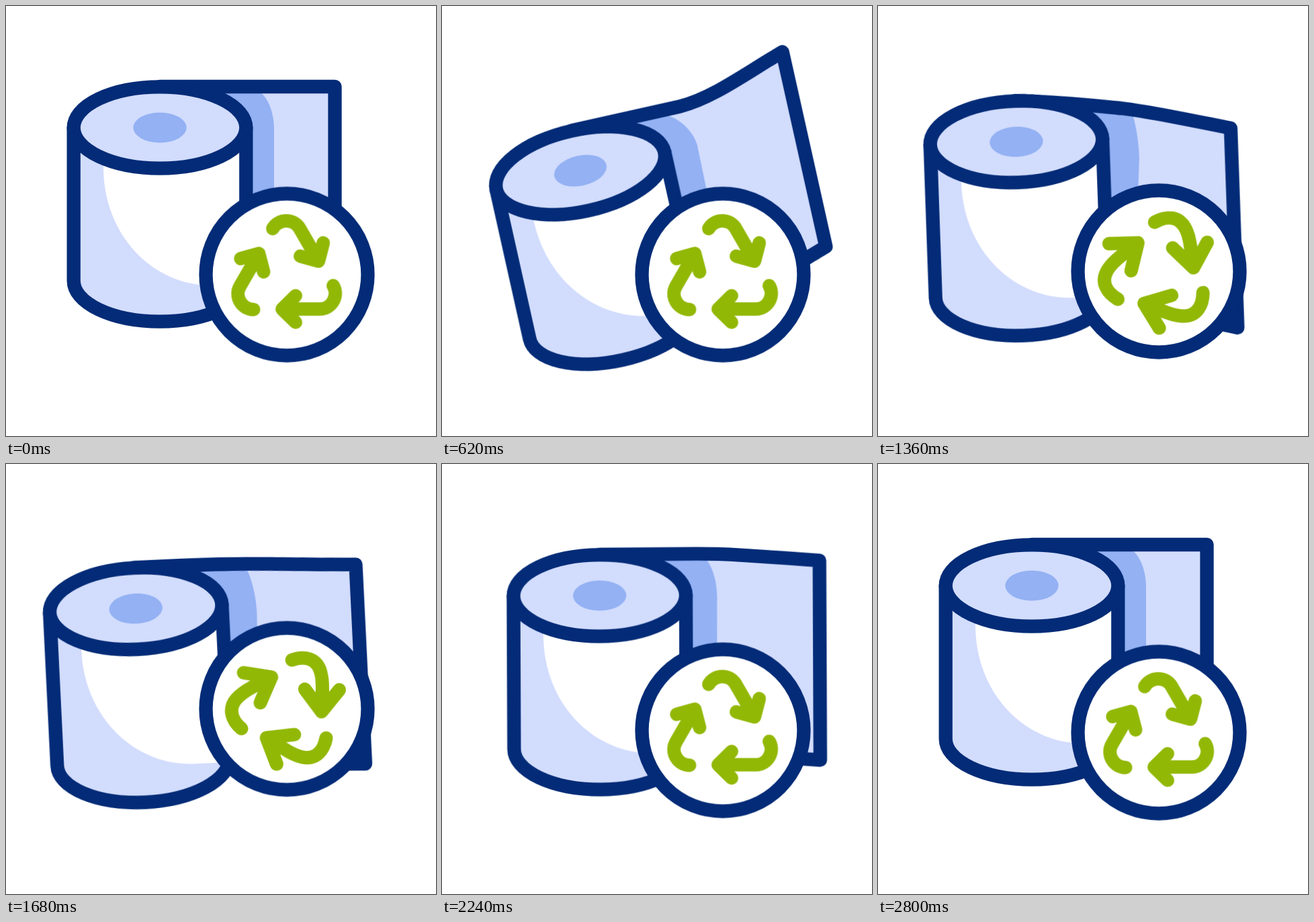
These frames come from a looping animation (640 px wide and 640 px high, 3.6 s). An HTML page without scripts:

```html
<!DOCTYPE html>
<html lang="en">
<head>
<meta charset="utf-8">
<title>Recycled paper roll</title>
<style>
html, body { margin: 0; width: 100%; height: 100%; overflow: hidden; background: #fff; }
svg { display: block; width: 100vw; height: 100vh; }
.line { stroke: #032b77; stroke-width: 20.3; stroke-linejoin: round; stroke-linecap: round; }
.light { fill: #d2dcfd; }
.shade { fill: #93b1f3; }
.white { fill: #fff; }
.none { fill: none; }
.arrow { fill: none; stroke: #92b806; stroke-width: 20; stroke-linecap: round; stroke-linejoin: round; }

.roll, .sheet, .fold, .badge, .spin, .arrow { animation: 3600ms linear infinite; }
.roll { animation-name: roll; }
.sheet { animation-name: sheet; }
.fold { animation-name: fold; }
.badge { animation-name: badge; }
.spin { animation-name: spin; }
.arrow { animation-name: stretch; }

/* whole roll: tilt back, spring up, sway left, settle */
@keyframes roll {
  0% { transform: translate(229px, 181px) rotate(0deg); animation-timing-function: cubic-bezier(.5, 0, .7, .8); }
  17.222% { transform: translate(206px, 245px) rotate(-12.6deg); animation-timing-function: ease-out; }
  18.333% { transform: translate(206px, 247px) rotate(-12.3deg); animation-timing-function: cubic-bezier(.5, 0, .7, .85); }
  28.889% { transform: translate(243px, 165px) rotate(6.9deg); animation-timing-function: ease-out; }
  30.556% { transform: translate(245px, 163.5px) rotate(7deg); animation-timing-function: cubic-bezier(.45, 0, .7, .7); }
  37.778% { transform: translate(206px, 202px) rotate(-2deg); animation-timing-function: cubic-bezier(.3, .4, .6, 1); }
  45% { transform: translate(190px, 214px) rotate(-3deg); animation-timing-function: cubic-bezier(.5, 0, .75, .7); }
  48.889% { transform: translate(206px, 220px) rotate(-2deg); animation-timing-function: cubic-bezier(.3, .4, .6, 1); }
  56.111% { transform: translate(240px, 211px) rotate(-.5deg); animation-timing-function: cubic-bezier(.4, 0, .5, 1); }
  68.889% { transform: translate(230px, 182.5px) rotate(0deg); animation-timing-function: ease-out; }
  77.778%, 100% { transform: translate(229px, 181px) rotate(0deg); }
}

/* loose end: top curve, right edge, same curve back */
@keyframes sheet {
  0% {
    d: path("M0 -61C50 -61 100 -61 150 -61C190 -61 225 -61 260.5 -61V236C225 236 190 236 150 236L0 236Z");
    animation-timing-function: cubic-bezier(.5, 0, .6, 1);
  }
  15% { d: path("M0 -61C50 -61 100 -61 165 -61C215 -62 275 -93 329 -112V185C275 204 215 235 165 236L0 236Z"); }
  17.222% {
    d: path("M0 -61C50 -61 100 -61 165 -61C215 -62 275 -89 332 -107V190C275 208 215 235 165 236L0 236Z");
    animation-timing-function: cubic-bezier(.4, 0, .7, .9);
  }
  28.889% {
    d: path("M0 -61C60 -55 110 -30 127 -24C150 -16 230 -22 287.6 -38V259C230 275 150 281 127 273L0 236Z");
    animation-timing-function: cubic-bezier(.4, 0, .6, 1);
  }
  37.778% {
    d: path("M0 -61C60 -58 115 -50 160 -44C200 -38 260 -23 319.5 -9V288C260 274 200 259 160 253L0 236Z");
    animation-timing-function: ease-in-out;
  }
  45% {
    d: path("M0 -61C50 -61 100 -61 150 -59C190 -58 250 -53 330 -50V247C250 244 190 239 150 238L0 236Z");
    animation-timing-function: ease-in-out;
  }
  56.111% {
    d: path("M0 -61C50 -61 100 -62 140 -62C185 -62 200 -57 332 -42V255C200 240 185 235 140 235L0 236Z");
    animation-timing-function: ease-in-out;
  }
  68.889% {
    d: path("M0 -61C50 -61 100 -61 150 -61C190 -61 250 -61 322 -61V236C250 236 190 236 150 236L0 236Z");
    animation-timing-function: cubic-bezier(.4, .2, .7, 1);
  }
  77.778%, 100% { d: path("M0 -61C50 -61 100 -61 150 -61C190 -61 225 -61 260.5 -61V236C225 236 190 236 150 236L0 236Z"); }
}

/* shadow of the roll on the loose end */
@keyframes fold {
  0% { d: path("M60 -58L131 -61C156 -58 170 -30 170 4L170 145L60 145Z"); animation-timing-function: cubic-bezier(.5, 0, .6, 1); }
  17.222% { d: path("M60 -58L118 -61C150 -58 175 -30 178 0L176 145L60 145Z"); animation-timing-function: cubic-bezier(.4, 0, .7, .9); }
  28.889% { d: path("M60 -40L150 -20C172 -14 184 5 183 28L174 145L60 145Z"); animation-timing-function: cubic-bezier(.4, 0, .6, 1); }
  37.778% { d: path("M60 -53L172 -43C177 -28 182 0 182 30L174 145L60 145Z"); animation-timing-function: ease-in-out; }
  56.111% { d: path("M60 -58L162 -61C172 -45 177 -20 177 2L177 145L60 145Z"); animation-timing-function: ease-in-out; }
  68.889% { d: path("M60 -58L137 -61C159 -58 172 -30 172 7L171 145L60 145Z"); animation-timing-function: ease-out; }
  77.778%, 100% { d: path("M60 -58L131 -61C156 -58 170 -30 170 4L170 145L60 145Z"); }
}

@keyframes badge {
  0%, 34.444% { transform: translate(418px, 399.7px); animation-timing-function: ease-in; }
  37.778% { transform: translate(418px, 395px); animation-timing-function: cubic-bezier(.3, .3, .6, 1); }
  50.5% { transform: translate(418px, 360px); animation-timing-function: ease-in; }
  56.111% { transform: translate(418px, 367.2px); animation-timing-function: cubic-bezier(.3, .3, .6, 1); }
  64.5%, 100% { transform: translate(418px, 399.7px); }
}

@keyframes spin {
  0%, 34.444% { transform: rotate(0deg); animation-timing-function: ease-in; }
  37.778% { transform: rotate(18deg); animation-timing-function: cubic-bezier(.3, .3, .5, 1); }
  55%, 100% { transform: rotate(360deg); }
}

@keyframes stretch {
  0%, 34.444%, 55%, 100% {
    d: path("M69.5 16.5C78.4 31.8 67.2 51.3 49.5 51.3C31 51.3 12 51.3 -6.5 51.3M13.5 31.5L-6.5 51.3L13.5 71");
  }
  37.778%, 46% {
    d: path("M72.8 8.9C78.7 27 75.6 44.8 56.6 51.3C41.5 56.4 24.9 53.9 -5.1 52.1M30 27.6L-5.1 52.1L28 79.7");
  }
}
</style>
</head>
<body>
<svg viewBox="0 0 640 640">
  <g class="roll" transform="translate(229 181)">
    <path class="sheet light" d="M0 -61C50 -61 100 -61 150 -61C190 -61 225 -61 260.5 -61V236C225 236 190 236 150 236L0 236Z"/>
    <path class="fold shade" d="M60 -58L131 -61C156 -58 170 -30 170 4L170 145L60 145Z"/>
    <path class="sheet line none" d="M0 -61C50 -61 100 -61 150 -61C190 -61 225 -61 260.5 -61V236C225 236 190 236 150 236L0 236Z"/>
    <path class="light" d="M-128.3 0V228A128.3 60.7 0 0 0 128.3 228V0Z"/>
    <path class="white" d="M-84 0V59C-84 159 -12 235 77 235H128V0Z"/>
    <path class="line none" d="M-128.3 0V228A128.3 60.7 0 0 0 128.3 228V0"/>
    <ellipse class="line light" rx="128.3" ry="60.7"/>
    <ellipse class="shade" rx="39.7" ry="22.5"/>
  </g>
  <g class="badge" transform="translate(418 399.7)">
    <circle class="line white" r="120.5"/>
    <g transform="translate(-.5 0)">
      <g class="spin">
        <path class="arrow" d="M69.5 16.5C78.4 31.8 67.2 51.3 49.5 51.3C31 51.3 12 51.3 -6.5 51.3M13.5 31.5L-6.5 51.3L13.5 71"/>
        <path class="arrow" transform="rotate(120)" d="M69.5 16.5C78.4 31.8 67.2 51.3 49.5 51.3C31 51.3 12 51.3 -6.5 51.3M13.5 31.5L-6.5 51.3L13.5 71"/>
        <path class="arrow" transform="rotate(240)" d="M69.5 16.5C78.4 31.8 67.2 51.3 49.5 51.3C31 51.3 12 51.3 -6.5 51.3M13.5 31.5L-6.5 51.3L13.5 71"/>
      </g>
    </g>
  </g>
</svg>
</body>
</html>
```
